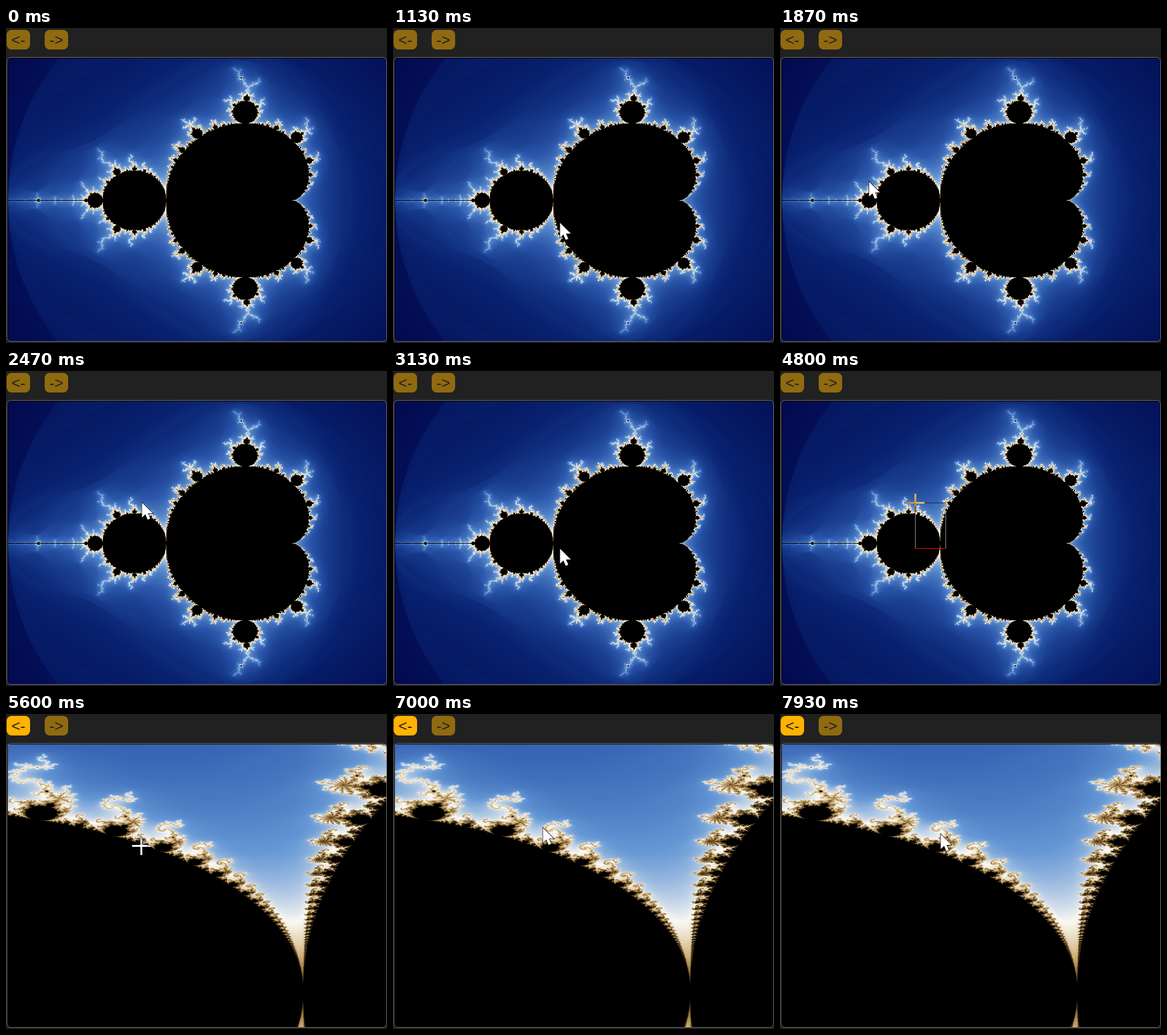
Recreate the animation shown at these times as an HTML page with a canvas. Size 601 by 498 pixels, loop 8 s.

```html
<!DOCTYPE html>
<html lang="en">
<head>
<meta charset="utf-8">
<title>Mandelbrot zoom</title>
<style>
  html, body { margin: 0; width: 100%; height: 100%; overflow: hidden; background: #212121; }
  canvas { position: absolute; left: 0; top: 0; }
  .button {
    position: absolute; top: 3px; width: 37px; height: 31px; border-radius: 8px;
    background: #ffb200; color: #212121; opacity: .5; text-align: center;
    font: 24px/32px "Liberation Sans", Arial, sans-serif;
  }
  #back { left: 1px; }
  #forward { left: 61px; }
</style>
</head>
<body>
<canvas id="stage" width="601" height="498"></canvas>
<div class="button" id="back">&lt;-</div>
<div class="button" id="forward">-&gt;</div>
<script>
const LOOP = 8000, STEP = 1000 / 15, MAX_ITER = 400;
const WIDTH = 601, HEIGHT = 498;
const ENTER_AT = 330, DRAG_FROM = 3870, ZOOM_AT = 5600, DRAG_TO = 6670;
const entry = { x: 590, y: 486 }, corner = { x: 261, y: 280 };

// One colour for each doubling of the escape count, starting at 2
const octaves = ["#010548", "#082270", "#2a56aa", "#6698d5", "#faf8f2", "#cdac70", "#785828", "#32200a", "#000000"]
  .map(hex => [1, 3, 5].map(i => parseInt(hex.slice(i, i + 2), 16)));

const moves = [
  { from: 330, to: 1130, x: 263, y: 308 },
  { from: 1200, to: 1600, x: 140, y: 243 },
  { from: 1870, to: 2530, x: 216, y: 207 },
  { from: 2800, to: 3130, x: 263, y: 281 },
  { from: 3800, to: 4800, x: 213, y: 208 },
  { from: 6600, to: 6730, x: 237, y: 182 },
  { from: 6930, to: 7330, x: 223, y: 155 },
  { from: 7730, to: 7930, x: 253, y: 190 }
];

const ctx = document.getElementById("stage").getContext("2d");
const back = document.getElementById("back");
const arrow = new Path2D("M0 0V23.5L5.3 18.5L9 27L13 25.3L9.4 17H17Z");

const clamp = (v, low, high) => Math.min(high, Math.max(low, v));
const mix = (a, b, u) => a + (b - a) * u;

function inMainBody(re, im) {
  const q = (re - .25) ** 2 + im * im;
  return q * (q + re - .25) <= im * im / 4 || (re + 1) ** 2 + im * im <= 1 / 16;
}

// Smooth escape count, or 0 for points that stay bounded
function escape(re, im) {
  if (inMainBody(re, im)) return 0;
  let x = 0, y = 0;
  for (let n = 1; n <= MAX_ITER; n++) {
    const next = x * x - y * y + re;
    y = 2 * x * y + im;
    x = next;
    const size = x * x + y * y;
    if (size > 4) return n + 1 - Math.log2(Math.log(size) / 2);
  }
  return 0;
}

function addColour(sum, count) {
  if (!count) return;
  const level = clamp(Math.log2(count) - 1, 0, octaves.length - 1.001);
  const i = Math.floor(level);
  for (let k = 0; k < 3; k++) sum[k] += mix(octaves[i][k], octaves[i + 1][k], level - i);
}

// Averages grid x grid samples in each pixel
function renderView(toRe, toIm, grid) {
  const view = document.createElement("canvas");
  view.width = WIDTH;
  view.height = HEIGHT;
  const context = view.getContext("2d");
  const image = context.createImageData(WIDTH, HEIGHT);
  const offset = i => (i + .5) / grid - .5;
  for (let y = 48; y < 496; y++) {
    for (let x = 3; x < WIDTH; x++) {
      const sum = [0, 0, 0];
      for (let i = 0; i < grid; i++) {
        for (let j = 0; j < grid; j++) addColour(sum, escape(toRe(x + offset(i)), toIm(y + offset(j))));
      }
      image.data.set([...sum.map(v => v / grid ** 2), 255], (y * WIDTH + x) * 4);
    }
  }
  context.putImageData(image, 0, 0);
  return view;
}

const whole = renderView(x => -2 + (x - 2.4) / 199.7, y => (272 - y) / 187.1, 1);
const zoomed = renderView(x => -.75 + (x - 468.5) / 2432, y => (439.5 - y) / 1146, 2);

function drawView(view) {
  ctx.save();
  ctx.beginPath();
  ctx.roundRect(1.5, 46.5, 599, 449, 6);
  ctx.clip();
  ctx.fillStyle = "#000";
  ctx.fillRect(0, 0, WIDTH, HEIGHT);
  ctx.drawImage(view, 0, 0);
  ctx.restore();
  ctx.strokeStyle = "#6f6d66";
  ctx.lineWidth = 1;
  ctx.stroke();
}

function drawSelection(x, y) {
  const bar = (colour, ...box) => {
    ctx.fillStyle = colour;
    ctx.fillRect(...box);
  };
  const w = corner.x - x, h = corner.y - y;
  bar("#1c2748", x, y, w, 1);
  bar("#8c8c8c", x, y, 1, h);
  bar("#8c8c8c", corner.x, y, 1, h);
  bar("#ff0000", x, corner.y, w + 1, 1);
}

// The cross inverts whatever lies below it
function drawCross(x, y) {
  ctx.save();
  ctx.globalCompositeOperation = "difference";
  ctx.fillStyle = "#fff";
  ctx.beginPath();
  ctx.rect(x - 14, y - 1, 29, 3);
  ctx.rect(x - 1, y - 14, 3, 29);
  ctx.fill();
  ctx.restore();
}

function drawArrow(x, y) {
  ctx.save();
  ctx.translate(x + .5, y);
  ctx.lineWidth = 1.4;
  ctx.strokeStyle = "#000";
  ctx.stroke(arrow);
  ctx.fillStyle = "#fff";
  ctx.fill(arrow);
  ctx.restore();
}

function cursorAt(t) {
  let { x, y } = entry;
  for (const move of moves) {
    const u = clamp((t - move.from) / (move.to - move.from), 0, 1);
    const eased = u * u * (3 - 2 * u);
    x = mix(x, move.x, eased);
    y = mix(y, move.y, eased);
  }
  return [Math.round(x), Math.round(y)];
}

function draw(time) {
  const t = Math.floor((time + 5) / STEP) * STEP + 4;
  const isZoomed = t >= ZOOM_AT;
  ctx.clearRect(0, 0, WIDTH, HEIGHT);
  drawView(isZoomed ? zoomed : whole);
  back.style.opacity = isZoomed ? 1 : .5;
  if (t < ENTER_AT) return;

  const [x, y] = cursorAt(t);
  if (t >= DRAG_FROM && t < DRAG_TO) {
    if (!isZoomed) drawSelection(x, y);
    drawCross(x, y);
  } else {
    drawArrow(x, y);
  }
}

const start = performance.now();
function tick() {
  draw((performance.now() - start) % LOOP);
  requestAnimationFrame(tick);
}
tick();
</script>
</body>
</html>
```
